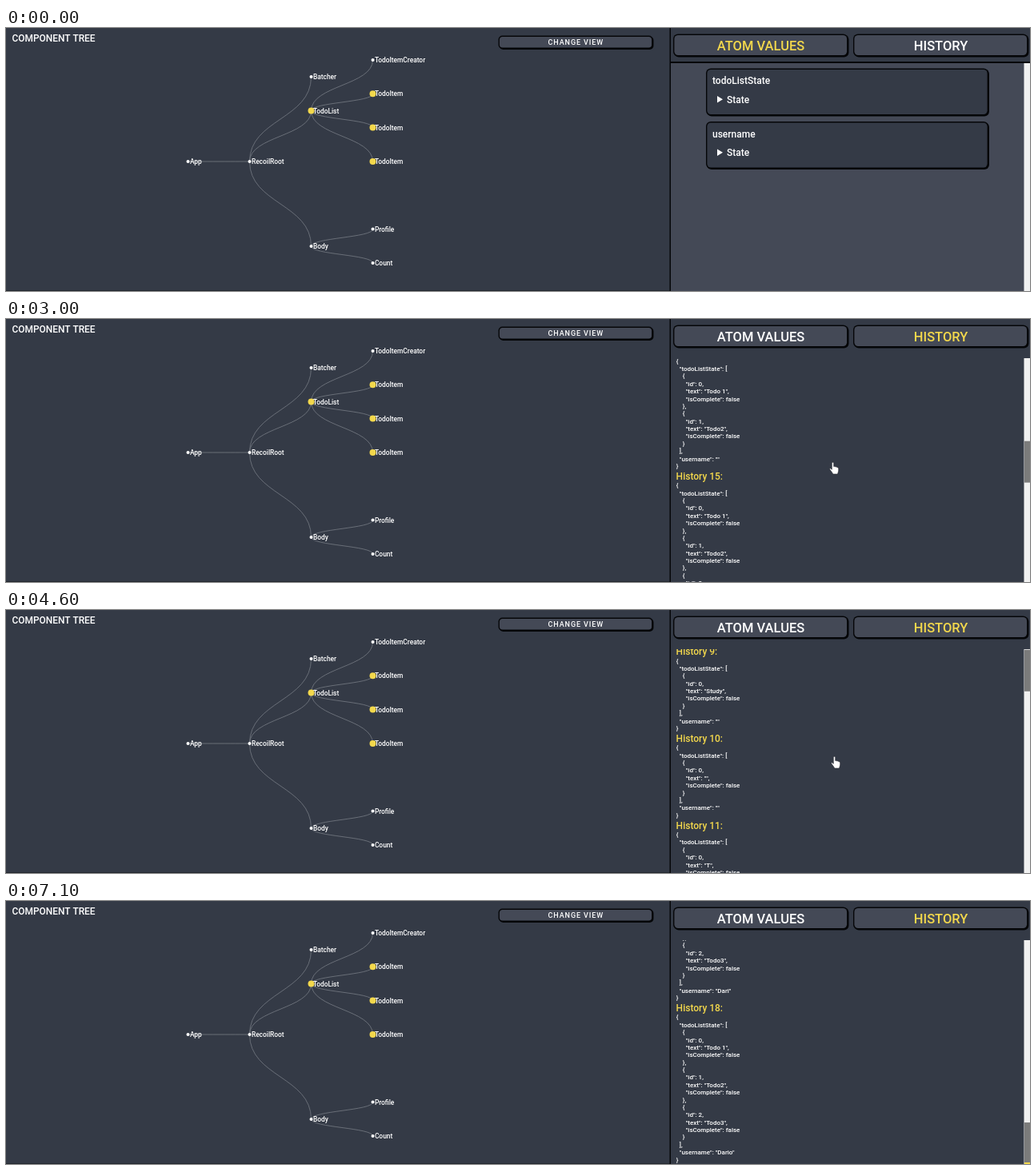
An HTML page with a canvas that plays this animation: 1280x329 px, repeating every 7150 ms.

```html
<!DOCTYPE html>
<html lang="en">
<head>
<meta charset="utf-8">
<title>Component tree</title>
<style>
html, body { margin: 0; width: 100%; height: 100%; overflow: hidden; background: #343a46; }
canvas { display: block; }
</style>
</head>
<body>
<canvas id="stage" width="1280" height="329"></canvas>
<script>
const ctx = document.getElementById('stage').getContext('2d');
const LOOP = 7150, STEP = 50, W = 1280, H = 329;
const DARK = '#343a46', LIGHT = '#444956', YELLOW = '#f3d84c', BLACK = '#050608';
const TOP = 49, LINE = 9.375, HEADING = 15;

// History log
const items = texts => texts.map((text, id) => ({ id, text, isComplete: false }));
const todos = ['Todo 1', 'Todo2', 'Todo3'];
const states = [
  [['Study'], ''], [[''], ''], [['T'], ''], [['Todo '], ''], [['Todo 1'], ''],
  [todos.slice(0, 2), ''], [todos, ''], [todos, 'D'], [todos, 'Dari'], [todos, 'Dario']
];
const rows = [];
let docHeight = 0;
states.forEach(([texts, username], i) => {
  rows.push({ y: docHeight + 11.3, text: `History ${i + 9}:`, heading: true });
  docHeight += HEADING;
  const json = JSON.stringify({ todoListState: items(texts), username }, null, 2);
  for (const line of json.split('\n')) {
    rows.push({ y: docHeight + 6.9, text: line });
    docHeight += LINE;
  }
});
const VIEW = H - TOP, MAX = docHeight - VIEW;

// Component tree: name, x, y, parent index, uses state
const nodes = [
  ['App', 227.5, 167],
  ['RecoilRoot', 304.5, 167, 0],
  ['Batcher', 381.5, 61, 1],
  ['TodoList', 381.5, 103.5, 1, true],
  ['Body', 381.5, 273, 1],
  ['TodoItemCreator', 458.5, 40, 3],
  ['TodoItem', 458.5, 82.3, 3, true],
  ['TodoItem', 458.5, 124.6, 3, true],
  ['TodoItem', 458.5, 167, 3, true],
  ['Profile', 458.5, 251.6, 4],
  ['Count', 458.5, 294, 4]
];

const scrollKeys = [
  [1950, MAX], [3000, 559], [3550, 295], [4150, 0], [4550, 0], [4600, 4.3],
  [5050, 760], [5200, 760], [5250, 827.7], [5350, 1000], [5500, 1000], [5900, MAX]
];
const cursorKeys = [
  [150, 1007, 300], [650, 1189, 15], [850, 1142, 27], [1250, 1142, 27],
  [1600, 1021.5, 151], [1950, 1021.5, 151], [3000, 1028.5, 178.5], [3550, 1030.5, 182.5],
  [5200, 1030.5, 182.5], [5250, 1031.5, 186.5], [5500, 1031.5, 186.5], [6200, 1209, 290], [6850, 1263, 320]
];
const hand = new Path2D('M5 .7Q6.2 .7 6.2 2V6Q7.5 5.5 8.2 6.4Q9.6 6 10.2 7Q12.2 6.8 12.2 8.6V11.5L11 15.5H5.2' +
  'Q4.6 14 3.2 12.2L1.2 9.6Q.8 8.2 2 8.2L3.8 9.8V2Q3.8 .7 5 .7Z');

function sample(keys, t) {
  const i = keys.findIndex(k => k[0] > t);
  if (i === 0) return keys[0].slice(1);
  if (i < 0) return keys[keys.length - 1].slice(1);
  const a = keys[i - 1], b = keys[i], p = (t - a[0]) / (b[0] - a[0]);
  return a.slice(1).map((v, n) => v + (b[n + 1] - v) * p);
}

function rect(x, y, w, h, fill) {
  ctx.fillStyle = fill;
  ctx.fillRect(x, y, w, h);
}

function label(text, x, y, size, { color = '#fff', align = 'left', spacing = 0 } = {}) {
  ctx.font = `500 ${size}px Roboto, sans-serif`;
  ctx.letterSpacing = spacing + 'px';
  ctx.textAlign = align;
  ctx.fillStyle = color;
  ctx.fillText(text, x, y);
}

function box(x, y, w, h, r, fill) {
  const round = (x, y, w, h, r, fill) => {
    ctx.beginPath();
    ctx.roundRect(x, y, w, h, r);
    ctx.fillStyle = fill;
    ctx.fill();
  };
  round(x + 1, y + 1, w, h, r, BLACK);
  round(x, y, w, h, r, BLACK);
  round(x + 1.4, y + 1.4, w - 2.8, h - 2.8, r - 1.2, fill);
}

function drawTree() {
  label('COMPONENT TREE', 7.6, 17.2, 11.9);
  box(615.5, 9.5, 193, 16.4, 5, LIGHT);
  label('CHANGE VIEW', 712.3, 20.8, 9, { align: 'center', spacing: 0.9 });

  ctx.strokeStyle = '#777b85';
  ctx.lineWidth = 0.8;
  for (const [, x, y, parent] of nodes) {
    if (parent === undefined) continue;
    const [, px, py] = nodes[parent], mid = (y + py) / 2;
    ctx.beginPath();
    ctx.moveTo(px, py);
    ctx.bezierCurveTo(px, mid, x, mid, x, y);
    ctx.stroke();
  }
  for (const [name, x, y, , active] of nodes) {
    ctx.beginPath();
    ctx.arc(x, y, active ? 4 : 2, 0, Math.PI * 2);
    ctx.fillStyle = active ? YELLOW : '#fff';
    ctx.fill();
    label(name, x + 2.4, y + 3, 8.4);
  }
  rect(0, 328, 830, 1, '#23272f');
}

function drawTabs(history) {
  ['ATOM VALUES', 'HISTORY'].forEach((name, i) => {
    const x = 834 + i * 225;
    box(x, 7.5, 218.5, 28, 6, LIGHT);
    label(name, x + 109.5, 27.5, 16.5, { align: 'center', color: history === !!i ? YELLOW : '#fff' });
  });
}

function drawAtoms() {
  rect(831, 44, W - 831, H - 44, LIGHT);
  rect(831, 42, W - 831, 2, BLACK);
  ['todoListState', 'username'].forEach((name, i) => {
    const y = 50.5 + i * 66.5;
    box(875, y, 353, 59, 6, DARK);
    label(name, 883, y + 19.5, 12);
    ctx.beginPath();
    ctx.moveTo(889, y + 34.5);
    ctx.lineTo(896, y + 38.8);
    ctx.lineTo(889, y + 43);
    ctx.fill();
    label('State', 901, y + 43, 12);
  });
  rect(1272.5, 44, 7.5, H - 44, '#f1f1f1');
}

function drawHistory(scroll) {
  ctx.save();
  ctx.beginPath();
  ctx.rect(831, TOP, W - 831, VIEW);
  ctx.clip();
  for (const { y, text, heading } of rows) {
    const top = TOP + y - scroll;
    if (top < TOP - 12 || top > H + 12) continue;
    if (heading) label(text, 837.6, top, 12, { color: YELLOW });
    else label(text, 837.8, top, 8);
  }
  rect(1272.5, TOP, 7.5, VIEW, '#f1f1f1');
  const thumb = VIEW * VIEW / docHeight;
  rect(1273, TOP + scroll / MAX * (VIEW - thumb), 7, thumb, '#7b7b7b');
  ctx.restore();
}

function drawCursor(t) {
  const [x, y] = sample(cursorKeys, t);
  ctx.save();
  ctx.translate(x, y);
  ctx.fillStyle = '#fff';
  ctx.fill(hand);
  ctx.strokeStyle = '#20232a';
  ctx.lineWidth = 0.6;
  ctx.stroke(hand);
  ctx.restore();
}

function draw(t) {
  const held = Math.floor(t / STEP) * STEP;
  const history = t >= 1060;
  rect(0, 0, W, H, DARK);
  drawTree();
  rect(829.5, 0, 1.5, H, BLACK);
  if (history) drawHistory(sample(scrollKeys, held)[0]);
  else drawAtoms();
  drawTabs(history);
  if (t >= 170 && t < 6910) drawCursor(held);
  if (t >= 7050) rect(1273, 327, 7, 2, YELLOW);
}

const start = performance.now();
function tick() {
  draw((performance.now() - start) % LOOP);
  requestAnimationFrame(tick);
}
tick();
</script>
</body>
</html>
```
